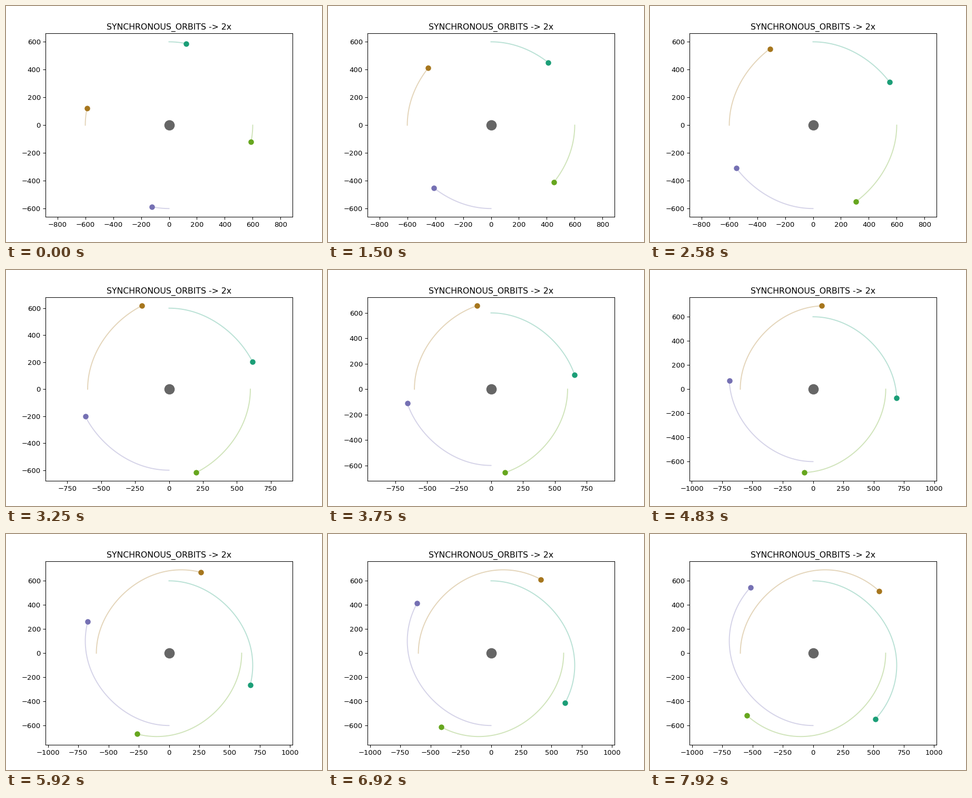
Write a matplotlib script that moves like this. It is 600 px wide and 450 px high and loops after 8 s.

```python
import numpy as np
import matplotlib.pyplot as plt
from matplotlib.animation import FuncAnimation

W, H, DPI = 600, 450, 100
LOOP, INTERVAL = 8000, 40
RATE = 12  # picture updates per second
SCALE = 0.945  # default matplotlib sizes, slightly reduced
LEFT, TOP, RIGHT, BOTTOM = 75, 52.4, 544, 402.1  # axes edges in pixels
START_R, DRIFT, MID_ANGLE, STEEPNESS = 600, 200, 99, 3.5
MARGIN = 1.1

plt.rcParams.update({
    "font.family": "DejaVu Sans",
    "font.size": 10 * SCALE,
    "axes.titlesize": 12 * SCALE,
    "axes.titlepad": 6 * SCALE,
    "axes.linewidth": 0.8 * SCALE,
    "lines.linewidth": 1.5 * SCALE,
})
for axis in ("xtick", "ytick"):
    plt.rcParams[axis + ".major.size"] = 3.5 * SCALE
    plt.rcParams[axis + ".major.width"] = 0.8 * SCALE
    plt.rcParams[axis + ".major.pad"] = 3.5 * SCALE


def swept_angle(i):
    """Degrees covered at a frame; the planets slow down as they drift out."""
    update = ((i + 1) * INTERVAL - 1) * RATE // 1000
    if update and update % 4 == 0:  # every fourth update repeats the last one
        update -= 1
    return np.interp(update / RATE, [0, 1.5, 3.75, 5.92, 7.92],
                     [11.7, 42.4, 80.4, 111.4, 136.7])


def path(angle, start):
    """Clockwise spiral from a start angle measured from the top."""
    grow = (angle / MID_ANGLE) ** STEEPNESS
    r = START_R + DRIFT * grow / (1 + grow)
    t = np.radians(angle + start)
    return r * np.sin(t), r * np.cos(t)


fig = plt.figure(figsize=(W / DPI, H / DPI), dpi=DPI, facecolor="white")
ax = fig.add_axes([LEFT / W, 1 - BOTTOM / H, (RIGHT - LEFT) / W, (BOTTOM - TOP) / H])
ax.set_title("SYNCHRONOUS_ORBITS -> 2x")
ratio = (RIGHT - LEFT) / (BOTTOM - TOP)


def dot(color, size):
    return ax.plot([0], [0], "o", color=color, ms=size * SCALE,
                   mew=SCALE, zorder=3, snap=False)[0]


dot("#666666", 14)
planets = []
for k, color in enumerate(("#1b9e77", "#66a61e", "#7570b3", "#a6761d")):
    trail, = ax.plot([], [], color=color, alpha=0.3)
    planets.append((90 * k, trail, dot(color, 7)))


def draw(i):
    angle = np.linspace(0, swept_angle(i), 200)
    for start, trail, planet in planets:
        x, y = path(angle, start)
        trail.set_data(x, y)
        planet.set_data(x[-1:], y[-1:])
    reach = MARGIN * max(START_R, path(angle, 0)[0].max())
    ax.set_xlim(-reach * ratio, reach * ratio)
    ax.set_ylim(-reach, reach)
    return []


anim = FuncAnimation(fig, draw, frames=LOOP // INTERVAL, interval=INTERVAL,
                     repeat=True, repeat_delay=0, blit=False)
plt.show()
```
